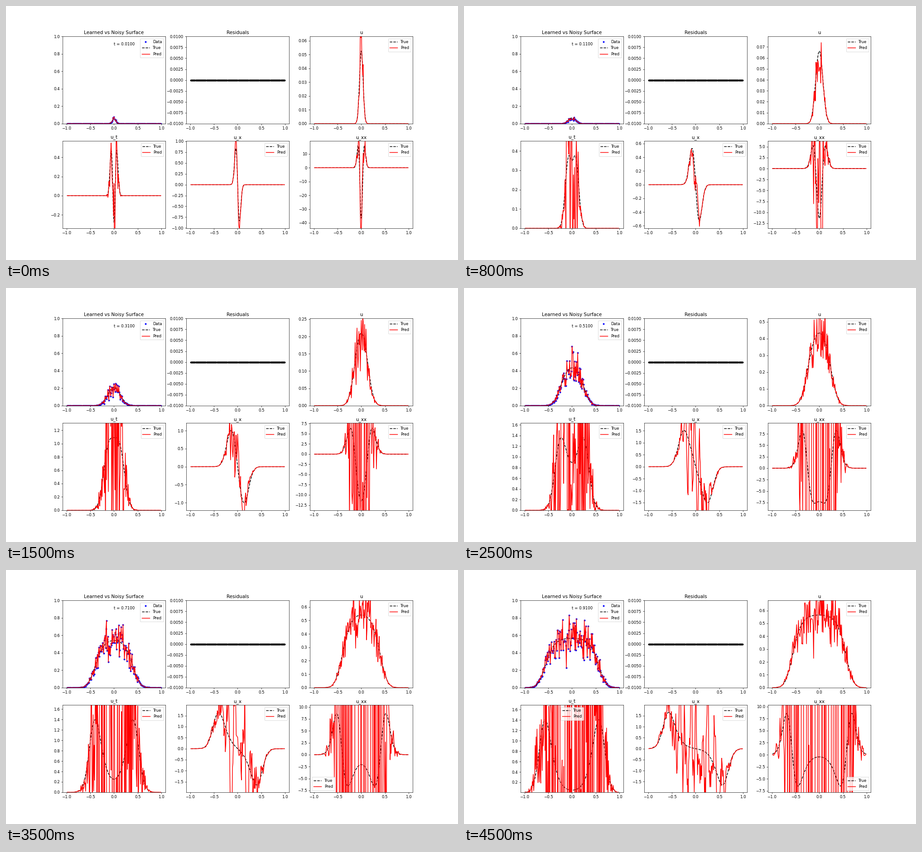
Write a matplotlib script that moves like this. It is 998 px wide and 561 px high and loops after 5000 ms.

```python
import numpy as np
import matplotlib.pyplot as plt
from matplotlib.animation import FuncAnimation

DPI = 62.375
D, R, K = 0.0208, 10.0, 0.5714      # diffusion, growth, carrying capacity
H, DT = 0.005, 0.0005               # solver grid
STEP = 0.01                         # spacing of the samples
NOISE = 0.22                        # relative to u
TIME_GAIN = 30                      # noise growth of the time derivative
REACH = 4                           # half width of the local fits
FRAMES = 10

plt.rcParams.update({"font.family": "DejaVu Sans",
                     "lines.linewidth": 1.7,
                     "lines.markersize": 7})


def laplacian(u):
    p = np.pad(u, 1, mode="reflect")
    return (p[2:] - 2 * u + p[:-2]) / H**2


def rate(u):
    return D * laplacian(u) + R * u * (1 - u / K)


def solve():
    """Logistic growth with diffusion; one row per 0.01 of time."""
    u = 0.1 * K * np.exp(-grid**2 / 0.002)
    rows = [u]
    for n in range(1, 2001):
        u = u + DT * rate(u)
        if n % 20 == 0:
            rows.append(u)
    return np.array(rows)


def fit(v, order):
    """Derivative of sliding parabolas fitted to v."""
    k = np.arange(-REACH, REACH + 1)
    weights = np.linalg.pinv(np.vander(k * STEP, 3, increasing=True))[order]
    return np.convolve(v, order * weights[::-1], "same")


grid = np.linspace(-1, 1, 401)
surface = solve()
INNER = slice(2, -2, 2)
x = grid[INNER]


def curves(i):
    """True and predicted curves of u, u_t, u_x and u_xx."""
    n = 10 * i + 1
    full = surface[n]
    u, ut, ux, uxx = true = [v[INNER] for v in (
        full, rate(full), np.gradient(full, H), laplacian(full))]
    rng = np.random.default_rng(40 + i)
    noise, jitter = NOISE * rng.normal(size=(2, x.size)).clip(-2.7, 2.7)
    noise *= u
    jitter *= TIME_GAIN * surface[n + REACH][INNER]
    pred = [u + noise, ut + jitter, ux + fit(noise, 1), fit(u + noise, 2)]
    return true, pred


def limits(v):
    lo, hi = 1.2 * v.min(), 1.2 * v.max()
    return (0 if abs(lo) < hi / 385 else lo), hi


def pair(ax):
    return ax.plot([], [], "k--", label="True")[0], ax.plot([], [], "r", label="Pred")[0]


fig, axes = plt.subplots(2, 3, figsize=(998 / DPI, 561 / DPI + 1e-9), dpi=DPI)
fig.subplots_adjust(left=0.125, right=0.9, bottom=0.125, top=0.88,
                    wspace=0.2, hspace=0.2)
titles = ["Learned vs Noisy Surface", "Residuals", "u", "u_t", "u_x", "u_xx"]
for ax, title in zip(axes.flat, titles):
    ax.set_title(title)
    ax.set_xlim(-1.089, 1.089)
main, resid, *panels = axes.flat

dots, = main.plot([], [], "b.", label="Data")
main_true, main_pred = pair(main)
main.set_ylim(0, 1)
main.legend(loc="upper right")
clock = main.text(0, 0.9, "")

resid.plot(x, 0 * x, "k.")
resid.set_ylim(-0.01, 0.01)

lines = [pair(ax) for ax in panels]
legends = [ax.legend(loc="upper right") for ax in panels]


def place_legends(i):
    """Legends step aside as the front spreads."""
    legends[1].set_loc("upper center" if i == 9 else "upper right")
    legends[3].set_loc("upper right" if i < 7 else
                       "lower left" if i < 9 else "lower right")


def update(i):
    true, pred = curves(i)
    dots.set_data(x, pred[0])
    main_true.set_data(x, true[0])
    main_pred.set_data(x, pred[0])
    clock.set_text(f"t = {0.01 + 0.1 * i:.4f}")
    for ax, (a, b), t, p in zip(panels, lines, true, pred):
        a.set_data(x, t)
        b.set_data(x, p)
        ax.set_ylim(*limits(t))
    place_legends(i)
    return []


anim = FuncAnimation(fig, update, frames=FRAMES, interval=500,
                     init_func=lambda: update(0), repeat=True, blit=False)
plt.show()
```
